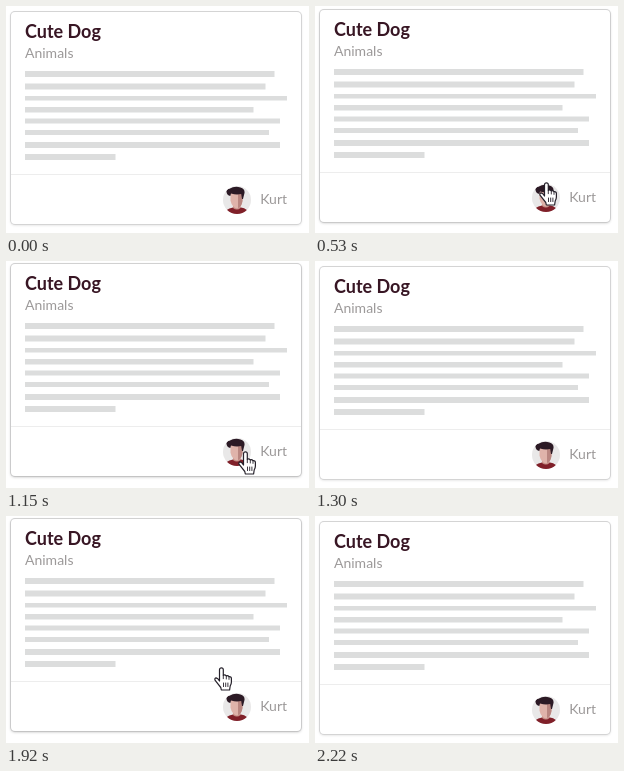
Animation, 303 px wide and 227 px high, one loop 2530 ms. Source, as an HTML page:

```html
<!DOCTYPE html>
<html lang="en">
<head>
<meta charset="utf-8">
<title>Card hover</title>
<style>
  html, body { margin: 0; width: 100%; height: 100%; overflow: hidden; background: #fff; }
  #stage { position: relative; width: 303px; height: 227px; overflow: hidden; }
  #card {
    position: absolute; left: 5px; top: 6px; width: 290px; height: 212px;
    border-radius: 4px; background: #fff;
    box-shadow: 0 1px 3px var(--shade, #d4d4d5), 0 0 0 1px #d4d4d5;
  }
  /* Inner drawing uses stage coordinates. */
  #card svg { position: absolute; left: -5px; top: -6px; }
  #hand { position: absolute; left: 0; top: 0; overflow: visible; }
  text { font-family: Lato, sans-serif; font-size: 14px; fill: #9c9999; }
  .title { font-size: 18px; font-weight: 700; fill: #381624; }
</style>
</head>
<body>
<div id="stage">
  <div id="card">
    <svg width="303" height="227">
      <text class="title" x="19" y="32">Cute Dog</text>
      <text x="19" y="52">Animals</text>
      <g id="lines" fill="#dcdddd"></g>
      <path d="M5 168.5H295" stroke="#ededed"/>
      <clipPath id="round"><circle cx="231" cy="194" r="14"/></clipPath>
      <g clip-path="url(#round)">
        <path fill="#e9e8e8" d="M217 180h28v28h-28z"/>
        <path fill="#802029" d="M218 208q1-5 9-6.500h8q7 1 8 6.500z"/>
        <path fill="#c58f87" d="M227 197h7.500v5q-3.500 3-7.500 0z"/>
        <path fill="#dfb3aa" d="M224.500 186h12v9q-1 7-5.500 7.500q-5-1-6.500-8z"/>
        <path fill="#b98680" d="M232 188h4.500v7q-1 6-4.500 7.200z"/>
        <path fill="#2c1a25" d="M220.500 186q-.5-3 3-3.200q5-3.300 11-1.400q4.500 1 4 5.600l-1.500 6h-1l-.8-5q-5 1-10.200-.5l-.7 2.500q-3.300-.5-3.800-4z"/>
      </g>
      <text x="281" y="198" text-anchor="end">Kurt</text>
    </svg>
  </div>
  <svg id="hand" width="18" height="24" fill="none" stroke="#25202a" stroke-width="1.200" stroke-linejoin="round" stroke-linecap="round">
    <path fill="#fff" d="M5.500 14V2.700a1.900 1.900 0 0 1 3.800 0V8.300q1.600-.9 3 .6q1.600-.6 2.700.8q2.300-.3 2.400 1.900V15q0 2-1.200 4L15.600 23H7.300L6.800 20.500Q3.500 16.500 1 13.200Q.4 11 2.200 10.900Q3.800 11.200 5.500 14Z"/>
    <path stroke-width=".9" d="M9.300 8.300v3.400M12.300 9v3M15 9.800v2.600M9.500 16v3.600M11.700 16v3.600M13.900 16v3.600"/>
  </svg>
</div>
<script>
  const LOOP = 2530;

  // Each bar: right edge, top, height.
  const bars = [
    [268.5, 65, 6], [259.5, 77.5, 6], [281, 90, 4.5], [247.5, 101, 5.5],
    [274, 112.5, 5], [263, 124, 5], [274, 136, 6], [109.5, 148, 6]
  ];
  document.getElementById("lines").innerHTML = bars.map(([right, y, h]) =>
    `<rect x="19" y="${y}" width="${right - 19}" height="${h}"/>`).join("");

  // Each step: start in ms, card lift, hand x and y (absent when hidden).
  const steps = [
    [0, 0],
    [460, 0, 239, 199], [530, 2, 224, 176], [610, 3, 207, 148], [690, 3, 194, 124], [760, 3, 189, 115],
    [990, 3, 200, 135], [1070, 3, 214, 160], [1150, 3, 232, 190], [1230, 3, 247, 215], [1300, 0], [1380, 0],
    [1530, 0, 243, 207], [1610, 2, 218, 167], [1690, 3, 189, 115],
    [1920, 3, 208, 151], [2000, 3, 230, 187], [2080, 3, 247, 215], [2150, 1], [2220, 0]
  ];

  const card = document.getElementById("card");
  const hand = document.getElementById("hand");
  const start = performance.now();

  function shade(lift) {
    const v = Math.round(212 - 24 * lift / 3);
    return `rgb(${v},${v},${v})`;
  }

  function draw(now) {
    const t = Math.max(0, now - start) % LOOP;
    const [, lift, x, y] = steps.findLast(step => step[0] <= t);
    card.style.transform = `translateY(${-lift}px)`;
    card.style.setProperty("--shade", shade(lift));
    hand.style.display = x === undefined ? "none" : "block";
    if (x !== undefined) hand.style.transform = `translate(${x}px, ${y}px)`;
    requestAnimationFrame(draw);
  }
  draw(start);
</script>
</body>
</html>
```
